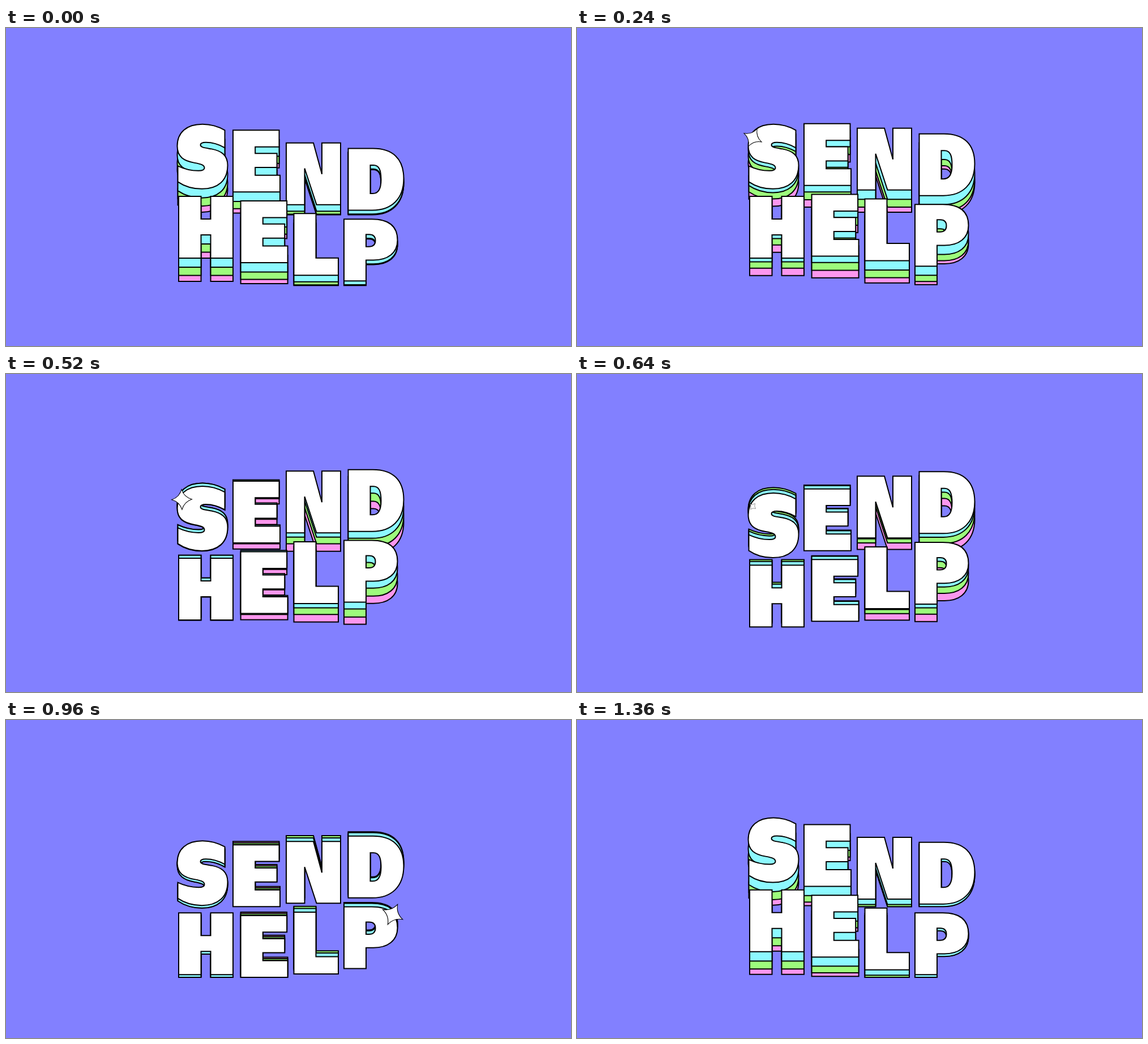
An HTML page for the animation above (1.4 s loop, 998 by 561 pixels).

```html
<!DOCTYPE html>
<html lang="en">
<head>
<meta charset="utf-8">
<title>Send help</title>
<style>
  html, body { margin: 0; width: 100%; height: 100%; overflow: hidden; background: #8280ff; }
  svg { display: block; width: 100%; height: 100%; }
</style>
</head>
<body>
<svg id="stage" viewBox="0 0 998 561" role="img" aria-label="SEND HELP"></svg>
<script>
const LOOP = 1400, STEP = 40;
const ROW_GAP = 124.7;   // distance between the two baselines
const LOWEST = 454.3;    // lowest point of the bottom baseline

// Letter outlines: x on the stage, y relative to the baseline
const E = 'M401 0V-109H482.5V-79.6H440.2V-68.2H478.6V-43.4H440.2V-29.5H484V0Z';
const shapes = {
  S: 'M386.5-101C374-108 361-111.5 347-111.5C319-111.5 302.5-97 302.5-73' +
     'C302.5-54 314-47 333-43.5C344-41.5 350.5-40 350.5-34.5' +
     'C350.5-31 347-29.5 340-29.5C328-29.5 315-32.5 303.5-38V-10' +
     'C316-1.5 330 2.5 346 2.5C374 2.5 391.5-12 391.5-39' +
     'C391.5-57 381-64.5 363-68C351-70 343.5-70.5 343.5-75' +
     'C343.5-78 347-79.5 353-79.5C363-79.5 376-76 386.5-70Z',
  E,
  N: 'M495 0V-109H543L558-54V-109H591V0H548.5L527.5-64V0Z',
  D: 'M604.5-109H648C683-109 702.5-91 702.5-56C702.5-20 681 0 647 0H604.5Z' +
     'M643.5-79.5V-29.5H648C658-29.5 662.5-39 662.5-54C662.5-71 659-79.5 649-79.5Z',
  H: 'M305 0V-109H344.5V-69H361.5V-109H401V0H361.5V-41H344.5V0Z',
  L: 'M508.5 0V-109H547.5V-30.5H587V0Z',
  P: 'M597-109H646C676-109 691.5-97 691.5-72C691.5-49 674-36.8 649-36.8H636V0H597Z' +
     'M636-82V-60.5H641C648.5-60.5 652.5-64 652.5-71.5C652.5-79 648-82 641.5-82Z'
};

// Back to front; each deeper layer lags more and swings less
const layers = [
  { fill: '#fc97ee', lag: 300, swing: 10.4 },
  { fill: '#9dfc7c', lag: 200, swing: 15.8 },
  { fill: '#8df9ff', lag: 100, swing: 20.9 },
  { fill: '#ffffff', lag: 0, swing: 25.95 }
];

// Time at which each column's front layer is highest
const peaks = [120, 220, 420, 520];

const stars = [
  { x: 310.5, dy: -88 - ROW_GAP, peak: peaks[0], from: 85, to: 684, lag: 0 },
  { x: 683, dy: -95.5, peak: peaks[3], from: 770, to: 1358, lag: 720 }
];
const STAR = 'M22.5 0Q5.2 5.2 0 22.5Q-5.2 5.2-22.5 0Q-5.2-5.2 0-22.5Q5.2-5.2 22.5 0Z';

const stage = document.getElementById('stage');

function addPath(d, fill, width) {
  const el = document.createElementNS('http://www.w3.org/2000/svg', 'path');
  const attrs = { d, fill, stroke: '#000', 'stroke-width': width, 'fill-rule': 'evenodd' };
  for (const key in attrs) el.setAttribute(key, attrs[key]);
  return stage.appendChild(el);
}

const parts = [];
['SEND', 'HELP'].forEach((word, row) => {
  [...word].forEach((char, col) => {
    for (const layer of layers) {
      parts.push({
        el: addPath(shapes[char], layer.fill, 2),
        x: row && char === 'E' ? 13.6 : 0,
        dy: row ? 0 : -ROW_GAP,
        peak: peaks[col],
        layer
      });
    }
  });
});
for (const star of stars) star.el = addPath(STAR, '#fff', 1.3);

function baseline(t, peak, { lag, swing }) {
  const phase = 2 * Math.PI * (t - peak - lag) / LOOP;
  return LOWEST - swing * (1 + Math.cos(phase));
}

function draw(t) {
  for (const p of parts) {
    const y = baseline(t, p.peak, p.layer) + p.dy;
    p.el.setAttribute('transform', `translate(${p.x} ${y.toFixed(2)})`);
  }
  for (const s of stars) {
    const k = (t - s.from) / (s.to - s.from);
    const on = k > 0 && k < 1;
    s.el.setAttribute('visibility', on ? 'visible' : 'hidden');
    if (!on) continue;
    const y = baseline(t, s.peak, layers[3]) + s.dy;
    const size = Math.sin(Math.PI * k) ** 0.85;
    const turn = 127 - 0.42 * (t - s.lag);
    s.el.setAttribute('transform', `translate(${s.x} ${y}) rotate(${turn}) scale(${size})`);
  }
}

function tick() {
  const t = performance.now() % LOOP;
  draw(Math.floor(t / STEP) * STEP);
  requestAnimationFrame(tick);
}
tick();
</script>
</body>
</html>
```
